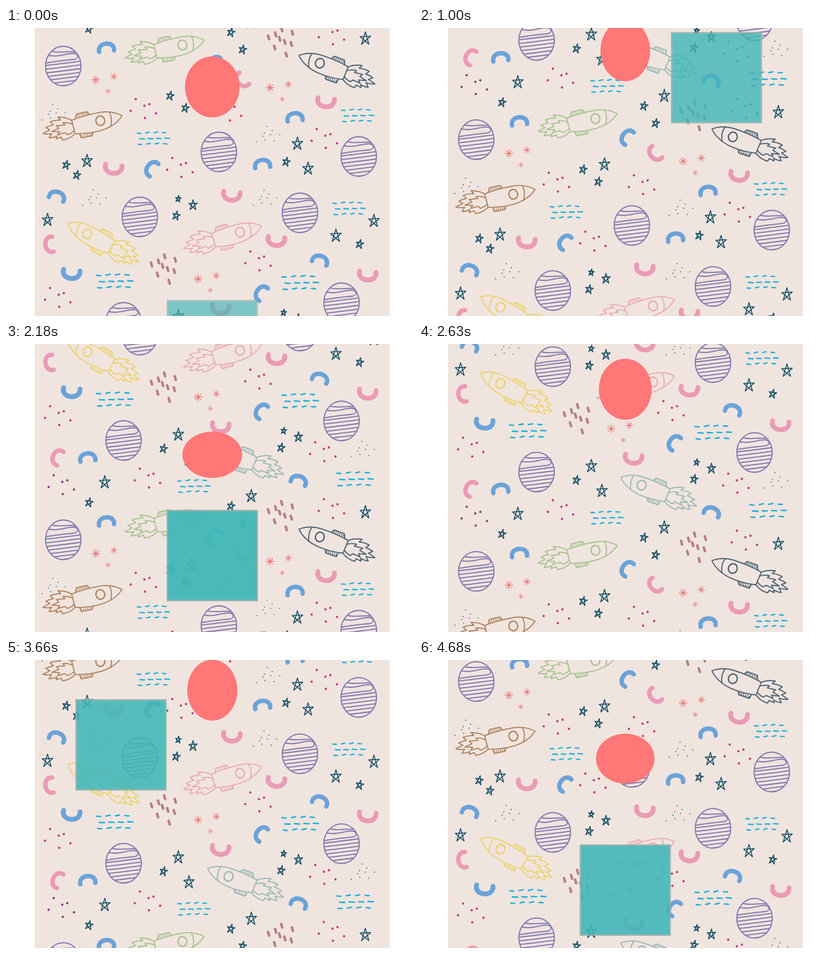
Animation of 803 by 567 pixels, one loop 4.7 s. Source, as an HTML page:

```html
<!DOCTYPE html>
<html lang="en">
<head>
<meta charset="utf-8">
<title>Space bounce</title>
<style>
html, body { margin: 0; width: 100%; height: 100%; overflow: hidden; background: #fff; }
svg { display: block; }
.line { fill: none; stroke-linecap: round; stroke-linejoin: round; }
</style>
</head>
<body>
<svg width="803" height="567" viewBox="0 0 803 567">
  <defs>
    <clipPath id="disc"><ellipse rx="35" ry="39"/></clipPath>

    <g id="planet" class="line" stroke="#827cb0" stroke-width="2.3">
      <ellipse rx="35" ry="39"/>
      <g id="stripes" clip-path="url(#disc)">
        <path d="M-22-29C-8-25 8-30 23-28M-29-21C-8-17 4-25 20-25C31-25 32-14 20-13C2-11-12-10-34-6"/>
      </g>
    </g>

    <g id="rocket" class="line" stroke-width="2.2">
      <path d="M0 0C10-9 25-15 40-16C62-17 82-16 99-13L98 14C80 19 60 20 45 19C26 17 10 10 0 0Z"/>
      <path d="M23-12C20-4 22 8 27 16"/>
      <ellipse cx="44" cy="0" rx="8.7" ry="9.5" stroke-width="2.7"/>
      <path d="M62-17L66-23L87-23L91-15M63 20L66 25.5L88 25L89 18"/>
      <path stroke-width="5.5" stroke-dasharray="1.5 2.5" stroke-linecap="butt" d="M66-19.5H89M66 22.5H88"/>
      <path d="M99-13Q109-22 124-25L120-18Q131-21 141-19L136-12Q145-12 152-10L145-4L160 0Q152 4 143 4L150 11Q142 13 134 11L137 16L126 15L125 21Q109 22 98 14"/>
      <path d="M99-5Q107-11 117-12L114-7L131-9L127-3L142 0L127 4L132 9L117 8L113 13Q104 12 99 8"/>
    </g>

    <path id="star" class="line" stroke="#0d4a60" d="M0-12.5L7 12L-10.5-3L10.5-4L-7.5 12Z"/>
    <path id="arc" class="line" stroke-width="8.5" d="M-14.5 7C-18-13 18-13 14.5 6"/>
    <path id="dashes" class="line" stroke="#1cb1d8" stroke-width="2.6"/>
    <path id="dots" class="line" stroke-width="4.5" d="M0 0h.1M10-23h.1M27-10h.1M37-13h.1M50 5h.1M28 14h.1"/>
    <path id="dust" class="line" stroke="#1f7f68" stroke-width="2.2"
      d="M0 0h.1M10 8h.1M-5 13h.1M-8 19h.1M7 16h.1M25 16h.1M14 28h.1M-4 26h.1M-21 30h.1"/>

    <path id="spark" class="line" stroke="#e8716f" d="M-8 0H8M0-8V8M-5.5-5.5L5.5 5.5M-5.5 5.5L5.5-5.5"/>
    <g id="sparks" stroke-width="1.3">
      <use href="#spark"/>
      <use href="#spark" transform="translate(36-6.5) scale(.85)"/>
      <use href="#spark" transform="translate(24 22.5) scale(.65)"/>
    </g>

    <path id="rain" class="line" stroke="#b77f7e" stroke-width="5"
      d="M-1-1l2 7M-13 9l2 7M-27 15l2 7M20 6l2 7M-5 18l2 7M5 24l2 7M-15 35l2 7M18 28l2 7M8 49l2 7"/>

    <g id="tile"></g>
  </defs>

  <rect x="57" width="700" height="567" fill="#f0e4df"/>
  <g id="sky"><use href="#tile"/><use href="#tile" y="-700"/></g>
  <ellipse id="ball" cx="407" fill="#ff7777"/>
  <g id="box"><rect x="1.5" y="1.5" width="177" height="177" fill="#40b7b8" stroke="#8eafac" stroke-width="3"/></g>
</svg>

<script>
const $ = id => document.getElementById(id);

function set(el, attrs) {
  for (const k in attrs) el.setAttribute(k, attrs[k]);
  return el;
}

function add(parent, tag, attrs) {
  parent.appendChild(set(document.createElementNS('http://www.w3.org/2000/svg', tag), attrs));
}

// Stamps a motif at each "x,y" spot of the wallpaper
function stamp(id, spots, more = '', attrs = {}) {
  for (const at of spots.split(' '))
    add($('tile'), 'use', { href: '#' + id, transform: `translate(${at}) ${more}`, ...attrs });
}

for (let y = -5; y < 40; y += 7.3)
  add($('stripes'), 'path', { d: `M-36 ${y + 4}Q-8 ${y + 1} 36 ${y - 5}` });

let rows = '';
for (let i = 0; i < 12; i++) {
  const row = i >> 2, col = i & 3;
  const x = -33 + col * 16.5 + (row === 1 ? 5 : row);
  const tilt = col % 3 ? (row === 1 ? .5 : -1.5) : .5;
  rows += `M${x} ${row * 11 - 10 - col * .4}l${row === 1 ? 9 : 7} ${tilt}`;
}
$('dashes').setAttribute('d', rows);

stamp('planet', '113,75 420,244 696,253 264,372 580,364 232,579.5 662,541');

function rocket(at, turn, flip, stroke) {
  stamp('rocket', at, `scale(${flip} 1) rotate(${turn})`, { stroke });
}
rocket('391,24', 12.5, -1, '#a7c48f');
rocket('229,173', 12.5, -1, '#b08560');
rocket('504,390', 16, -1, '#e9adb1');
rocket('578,54', 20.5, 1, '#4c6472');
rocket('398,590', 20.5, 1, '#9cb9b5');
rocket('122,384', 28.5, 1, '#ecd36b');

function stars(size, turn, spots) {
  stamp('star', spots, `rotate(${turn}) scale(${size})`, { 'stroke-width': 1.7 / size });
}
stars(1, 0, '709,20 575,227 160,261 596,276 82,377 651,408 726,379 340,567 195,661 484,688 361,616 366,123');
stars(.8, 0, '369,348 577,572');
stars(.72, 12, '324,133 354,157 467,42 444,8 119,269 140,289 553,263 336,369 698,425 311,595 543,593 164,1');
stars(.54, 8, '340,336 548,560');

function arcs(stroke, turn, spots) {
  stamp('arc', spots, `rotate(${turn}) scale(${turn > 90 ? 1.12 : 1.02})`, { stroke });
}
const BLUE = '#6ba3d8', PINK = '#ea9bb5';
arcs(BLUE, -4, '198,39 570,176 506,268 161,613');
arcs(BLUE, 20, '101,331 620,457 578,658');
arcs(BLUE, -53, '287,276 503,521 410,69');
arcs(BLUE, 187, '129,484');
arcs(PINK, 187, '631,146 212,277 445,330 533,419 713,487 423,553');
arcs(PINK, -94, '86,426');
arcs(PINK, -63, '101,612');
arcs(PINK, -129, '465,103');

stamp('dashes', '292,217 695,172 678,355 372,669');
stamp('dashes', '216,498 582,501 690,655', 'scale(1.13 1.1)');
stamp('dots', '246,163 414,168 603,222 318,279 472,463 77,535 254,658 600,606 617,18', '', { stroke: '#c0397f' });
stamp('dots', '84,671', '', { stroke: '#8a3a7c' });
stamp('dust', '92,151 515,194 172,319 509,319 702,581');
stamp('sparks', '177,102 521,117.5 379,494');
stamp('rain', '313,447 544,0');

const LOOP = 4700, STEP = 147.1;
const fract = x => x - Math.floor(x);
const part = (a, b, x) => Math.min(1, Math.max(0, (x - a) / (b - a)));
function ease(a, b, x) {
  const t = part(a, b, x);
  return t * t * (3 - 2 * t);
}

// The scroll drags a little early on and catches up before the loop ends
function scroll(step) {
  return 20.7 * step + 5 * part(20, 28, step);
}

function drawBall(beat) {
  const t = fract(beat - .965);
  const fall = ease(.535, .975, t);
  const land = ease(.84, .96, t);
  const bottom = 100 + 183 * (Math.exp(-6.8 * t) + fall);
  const width = 97 + 23 * Math.exp(-6 * t) + 13 * fall + 10 * land;
  const height = 120 - 31 * (1 - ease(0, .1, t) + land);
  set($('ball'), { rx: width / 2, ry: height / 2, cy: bottom - height / 2 });
}

// Drops into a side lane, swings 90 degrees on its inner top corner, then falls away
function drawBox(beat) {
  const round = Math.floor(beat - .17);
  const t = beat - .17 - round;
  const late = Math.max(0, t - .789);
  const top = Math.min(285, 1257 * t * t - 136) + 1850 * late;
  const s = part(.516, .629, t);
  const turn = 90 * s * s * (3.2 * s - 2.2);
  const place = round === 0
    ? `translate(497 ${top}) rotate(${turn})`
    : `translate(317 ${top}) rotate(${-turn}) translate(-180 0)`;
  set($('box'), { transform: place, opacity: Math.min(.95, .45 + 1.05 * t, 1 - 2.6 * late) });
}

function draw(time) {
  const shift = scroll(Math.floor((time + 31) / STEP));
  const beat = (33 + shift) / 350;
  set($('sky'), { transform: `translate(0 ${shift})` });
  drawBall(beat);
  drawBox(beat);
}

const begin = performance.now();
function tick() {
  draw((performance.now() - begin) % LOOP);
  requestAnimationFrame(tick);
}
draw(0);
requestAnimationFrame(tick);
</script>
</body>
</html>
```
